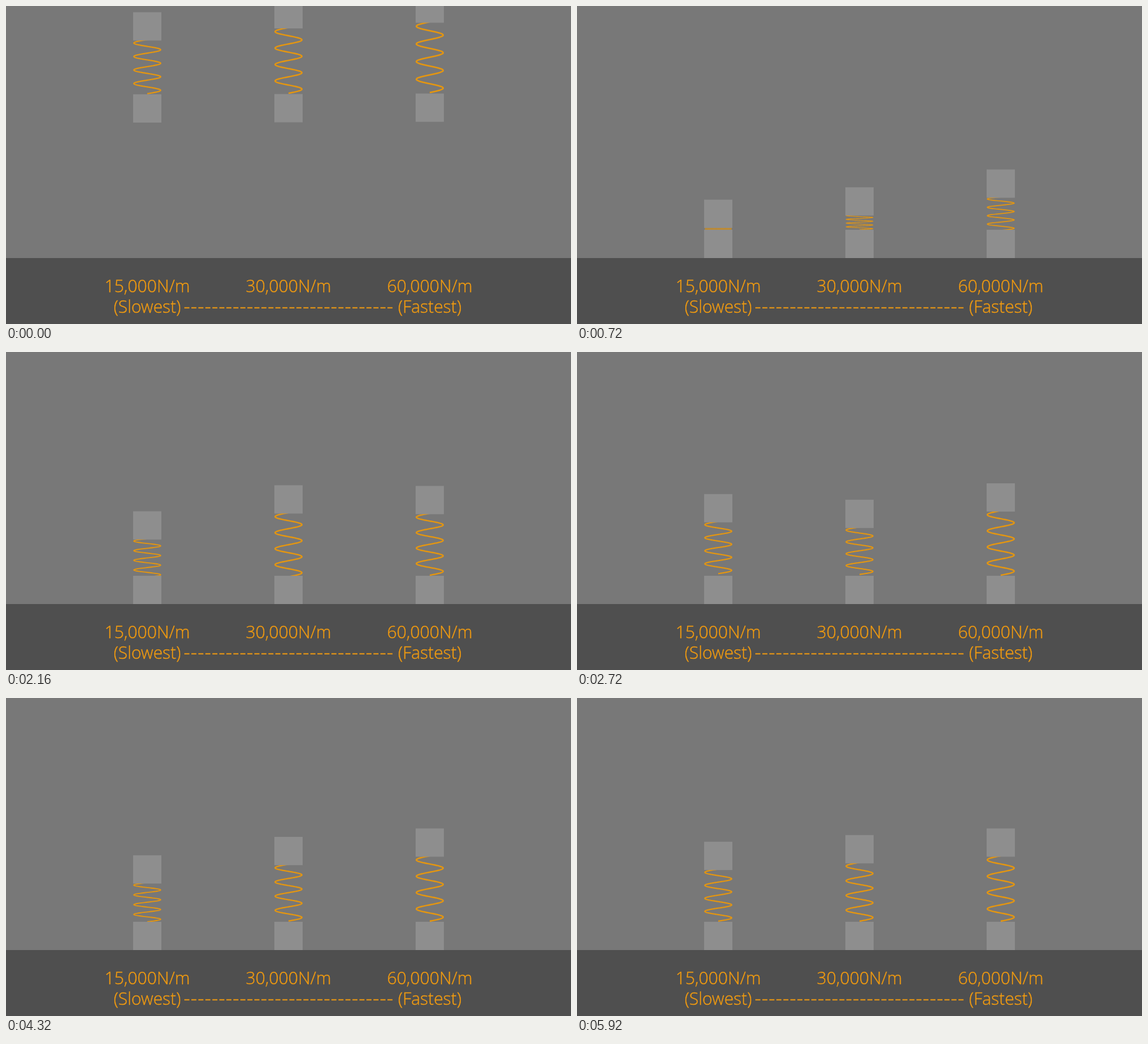
Recreate the animation shown at these times as an HTML page with a canvas. Size 960x540 px, loop 6 s.

```html
<!DOCTYPE html>
<html lang="en">
<head>
<meta charset="utf-8">
<title>Spring stiffness</title>
<style>
  html, body { margin: 0; width: 100%; height: 100%; overflow: hidden; background: #787878; }
  canvas { display: block; width: 960px; height: 540px; }
</style>
</head>
<body>
<canvas id="stage" width="960" height="540"></canvas>
<script>
const ctx = document.getElementById("stage").getContext("2d");
const LOOP = 6000, STEP = 80;
const FLOOR = 428, SIZE = 48, REST = FLOOR - SIZE;
const GRAVITY = 1285, NATURAL = 169, HEAD_START = 0.095, DROP_FROM = 138, LANDING = 0.5;
const ORANGE = "#f09a10";

// sag: static compression; loss: damping while falling;
// reach: longest spring before the lower block is pulled off the floor;
// turns: [s, top edge] where the upper block reverses; ring: final damped swing.
const columns = [
  { x: 240, label: "15,000N/m", sag: 42, loss: 0.45, reach: 211,
    turns: [[0.67, 331], [1.33, 178], [1.9, 308]],
    ring: { mid: 253, start: 2.497, period: 1.136, size: 39, decay: 0.43 } },
  { x: 480, label: "30,000N/m", sag: 21, loss: 0.95, reach: 172.5,
    turns: [[0.68, 309], [1.43, 143], [1.81, 274]],
    ring: { mid: 232, start: 2.4, period: 0.805, size: 32, decay: 0.95 } },
  { x: 720, label: "60,000N/m", sag: 10.5, loss: 1.6, reach: 175,
    turns: [[0.66, 282], [1.17, 152], [1.64, 243]],
    ring: { mid: 221.5, start: 1.9, period: 0.55, size: 11.5, decay: 2.5 } }
];
for (const { turns, ring } of columns) turns.push([ring.start, ring.mid - ring.size]);

// Free fall of two equal blocks joined by the spring.
function fall({ sag, loss }, t) {
  const s = t + HEAD_START;
  const swing = Math.cos(Math.sqrt(2 * GRAVITY / sag) * s) * Math.exp(-loss * s);
  const length = NATURAL - sag * swing;
  const centre = DROP_FROM - (NATURAL - sag) / 2 + GRAVITY * s * s / 2;
  return { top: centre - length / 2, base: Math.min(REST, centre + length / 2) };
}

// Upper block after the landing: squash, swing between turns, then ring out.
function bounce(col, t) {
  const { turns, ring } = col;
  if (t >= ring.start) {
    const s = t - ring.start;
    return ring.mid - ring.size * Math.exp(-ring.decay * s) * Math.cos(2 * Math.PI * s / ring.period);
  }
  const next = turns.findIndex(turn => turn[0] > t);
  const [t1, y1] = turns[next];
  if (next === 0) {
    const y0 = fall(col, LANDING).top;
    return y0 + (y1 - y0) * Math.sin(Math.PI / 2 * (t - LANDING) / (t1 - LANDING));
  }
  const [t0, y0] = turns[next - 1];
  return y0 + (y1 - y0) * (1 - Math.cos(Math.PI * (t - t0) / (t1 - t0))) / 2;
}

function pose(col, t) {
  if (t < LANDING) return fall(col, t);
  const top = bounce(col, t);
  return { top, base: Math.min(REST, top + col.reach) };
}

function drawSpring(x, from, to) {
  const coils = 4, radius = 22.8, points = 240;
  const length = Math.max(2, to - from);
  ctx.beginPath();
  for (let i = 0; i <= points; i++) {
    const u = i / points;
    ctx.lineTo(x - radius * Math.sin(2 * Math.PI * coils * u), from + length * u);
  }
  ctx.strokeStyle = "#e5960f";
  ctx.lineWidth = 2.5 * Math.sqrt(length / 120);
  ctx.lineJoin = "round";
  ctx.stroke();
}

function drawColumn(col, t) {
  const { top, base } = pose(col, t);
  const speed = (pose(col, t + 0.005).top - pose(col, t - 0.005).top) / 0.01;
  const lag = Math.max(-7, Math.min(5, 0.014 * speed));
  ctx.save();
  ctx.beginPath();
  ctx.rect(0, 0, 960, base);
  ctx.clip();
  drawSpring(col.x, top + SIZE - 1.5, base - 1 - lag);
  ctx.restore();
  ctx.fillStyle = "#8e8e8e";
  for (const y of [top, base]) ctx.fillRect(col.x - SIZE / 2, y, SIZE, SIZE);
}

function write(text, x, y) {
  ctx.fillText(text, x, y);
  ctx.strokeText(text, x, y);
}

function drawCaptions() {
  ctx.fillStyle = ctx.strokeStyle = ORANGE;
  ctx.font = "300 28.9px 'Open Sans', 'Noto Sans', sans-serif";
  ctx.textAlign = "center";
  ctx.lineWidth = 0.4;
  for (const col of columns) write(col.label, col.x, 486);
  write("(Slowest)", 240, 521);
  write("(Fastest)", 720, 521);
  ctx.lineWidth = 2;
  ctx.setLineDash([8.6, 3.3]);
  ctx.beginPath();
  ctx.moveTo(303, 512.5);
  ctx.lineTo(657, 512.5);
  ctx.stroke();
  ctx.setLineDash([]);
}

function draw(ms) {
  const t = Math.floor(ms % LOOP / STEP) * STEP / 1000;
  ctx.fillStyle = "#787878";
  ctx.fillRect(0, 0, 960, 540);
  for (const col of columns) drawColumn(col, t);
  ctx.fillStyle = "#4f4f4f";
  ctx.fillRect(0, FLOOR, 960, 540 - FLOOR);
  drawCaptions();
}

const begin = performance.now();
function tick() {
  draw(performance.now() - begin);
  requestAnimationFrame(tick);
}
tick();
</script>
</body>
</html>
```
